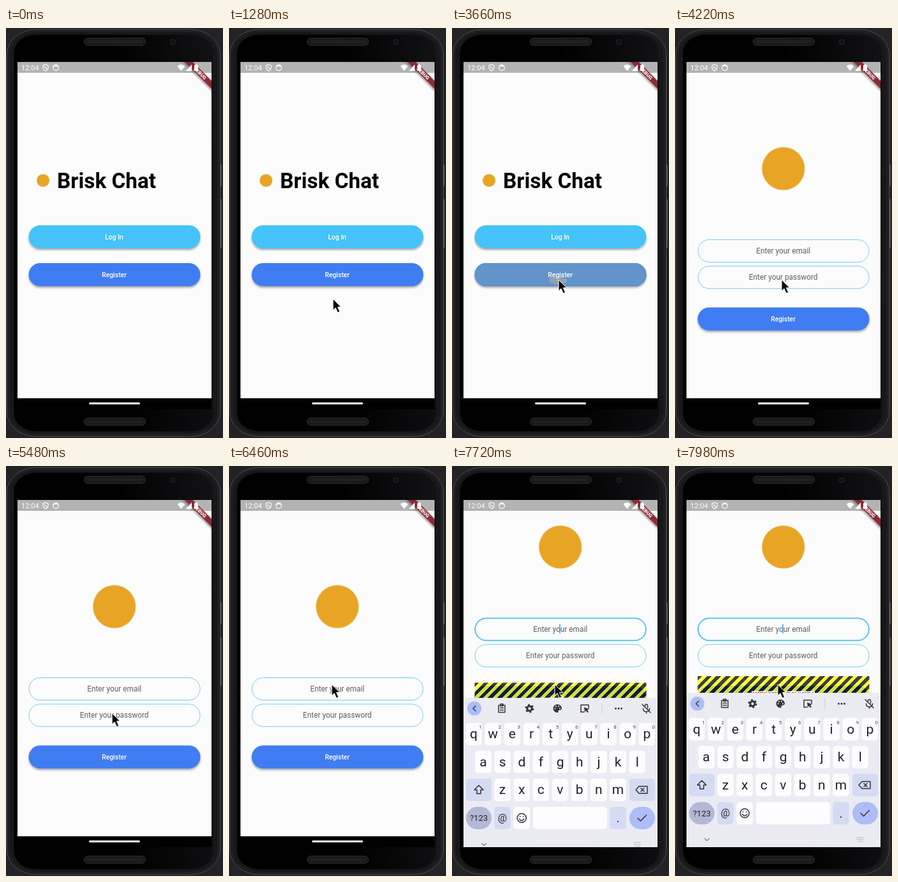
An HTML page for the animation above (8000 ms loop, 340 by 640 pixels).

```html
<!DOCTYPE html>
<html lang="en">
<head>
<meta charset="utf-8">
<title>Sign up on a phone</title>
<style>
  html, body { margin: 0; width: 100%; height: 100%; overflow: hidden; background: #232325; }
  svg { display: block; width: 340px; height: 640px; font-family: Roboto, sans-serif; }
  .mid { text-anchor: middle; }
  .label { font-size: 10.4px; font-weight: 500; fill: #fff; text-anchor: middle; }
  .hint { font-size: 11.85px; fill: #5e5e60; text-anchor: middle; }
  .line { fill: none; stroke: #333338; stroke-width: 1.5; stroke-linecap: round; stroke-linejoin: round; }
  .thin { stroke: #77777c; stroke-width: 1.1; }
</style>
</head>
<body>
<svg id="stage" viewBox="0 0 340 640"></svg>
<script>
const LOOP = 8000;
const PAPER = '#fcfcfc', BLUE = '#407df2', CYAN = '#44c3fa';
const TRAY = '#ebebf3', KEY = '#fdfdff', SOFT_KEY = '#d4dbf3', ACCENT = '#acbdf8';

const box = (x, y, w, h, r, fill, extra = '') =>
  `<rect x="${x}" y="${y}" width="${w}" height="${h}" rx="${r}" fill="${fill}" ${extra}/>`;
const text = (x, y, s, attrs) => `<text x="${x}" y="${y}" ${attrs}>${s}</text>`;
const line = (d, attrs = 'class="line"') => `<path d="${d}" ${attrs}/>`;
const button = (y, fill, label, overlay = '') =>
  box(35.5, y, 269, 36, 18, fill, 'filter="url(#shadow)"') + overlay +
  text(169.5, y + 21.5, label, 'class="label"');
const field = (y, hint) =>
  box(36, y, 268, 35, 17.5, 'none', 'stroke="#7cc6f8"') +
  text(169.7, y + 21.2, hint, 'class="hint"');

const defs = `<defs>
  <clipPath id="screen"><rect x="18" y="53" width="304" height="542"/></clipPath>
  <clipPath id="press"><rect x="35.5" y="367" width="269" height="36" rx="18"/></clipPath>
  <filter id="shadow" x="-5%" y="-20%" width="110%" height="160%">
    <feDropShadow dx="0" dy="2.4" stdDeviation="1.7" flood-color="#202028" flood-opacity=".4"/>
  </filter>
  <linearGradient id="face" x1="0" y1=".1" x2="1" y2="0">
    <stop offset=".5" stop-color="#000"/><stop offset="1" stop-color="#121215"/>
  </linearGradient>
  <linearGradient id="hazard" gradientUnits="userSpaceOnUse" x1="18" y1="53" x2="25.4" y2="60.4" spreadMethod="repeat">
    <stop offset=".25" stop-color="#000"/><stop offset=".25" stop-color="#ff0"/>
    <stop offset=".75" stop-color="#ff0"/><stop offset=".75" stop-color="#000"/>
  </linearGradient>
</defs>`;

const slot = y => box(122.5, y, 96, 11, 5.5, '#161618', 'stroke="#363638"') +
  box(126, y + 3, 89, 5, 2.5, '#202022');

const phone = box(334, 213, 4, 34, 1, '#505053') + box(334, 267, 4, 76, 1, '#505053') +
  box(1.5, 2.5, 334, 635, 46, '#18181a', 'ry="38" stroke="#525255"') +
  box(4.5, 5.5, 328, 629, 43, 'none', 'ry="35" stroke="#2c2c2f"') +
  box(12.5, 10.5, 312, 619, 34, 'url(#face)', 'ry="28"') + slot(16) + slot(609) +
  '<circle cx="261.5" cy="22" r="4" fill="#111114" stroke="#29292c"/>';

const welcome = box(18, 53, 304, 525, 0, PAPER) +
  text(80, 249.5, 'Brisk Chat', 'font-size="33.3" font-weight="700" fill="#050505"') +
  button(308, CYAN, 'Log In') +
  button(367, BLUE, 'Register', `<g clip-path="url(#press)">
    ${box(35.5, 367, 269, 36, 18, '#6294ca', `id="glow" stroke="${BLUE}"`)}
    <ellipse id="ripple" cx="166" cy="394" rx="14" ry="6.5" fill="#93a2b4"/></g>`);

const signup = `<g id="signup">${box(18, 53, 304, 525, 0, PAPER)}<g id="form">
  ${field(330.5, 'Enter your email')}
  <g id="focus">${box(36.2, 330.7, 267.6, 34.6, 17.3, 'none', 'stroke="#44c0f4" stroke-width="1.7"')}
    ${box(168.2, 340, 1.5, 14.5, 0, '#3f9fe8')}</g>
  ${field(371.7, 'Enter your password')}${button(436.2, BLUE, 'Register')}</g></g>`;

const hazard = `<g id="hazard-bar">${box(35.5, 328, 269, 30, 0, 'url(#hazard)', 'opacity=".75"')}
  ${box(120, 351.5, 99, 7, 0, '#fff')}
  ${text(169.5, 357, 'BOTTOM OVERFLOWED BY 41 PIXELS', 'class="mid" font-size="5.6" font-weight="800" fill="#a01818"')}</g>`;

const status = box(18, 53, 304, 17, 0, '#b3b3b4') +
  `<g transform="translate(304.2 70.8) rotate(45)">${box(-40, -4.5, 80, 9, 0, '#8b2c38', 'filter="url(#shadow)"')}
    ${text(0, 2.7, 'DEBUG', 'class="mid" font-size="7.5" font-weight="800" fill="#fff"')}</g>` +
  text(24, 66, '12:04', 'font-size="11" letter-spacing=".1" fill="#fff"') +
  `<g fill="none" stroke="#fff" stroke-width="1.2">
    <path d="M62 57l4 1.5v3q0 3.5-4 5.5q-4-2-4-5.5v-3zM60 60l4 4"/><circle cx="78" cy="62" r="4.3"/></g>
  <g fill="#fff"><path d="M74 61a4 4 0 0 1 8 0l-2-1h-4z"/>
    <path d="M268.5 59.5q6-5 12 0l-6 7.5z"/><path d="M282 67h9v-10z"/>
    <path d="M295 58h1.5v-1.5h3v1.5h1.5v9h-6z"/></g>`;

// Keyboard, drawn in its open position
const PITCH = 30.15;
const key = (x, y, w = 25.5, fill = KEY, r = 5) => box(x - w / 2, y - 17.5, w, 35, r, fill);
const letter = (x, y, c, size = 21) => text(x, y + 6.5, c, `class="mid" font-size="${size}" fill="#222226"`);
const row = (letters, x0, y, numbered) => [...letters].map((c, i) => {
  const x = x0 + i * PITCH;
  return key(x, y) + letter(x, y, c) +
    (numbered ? text(x + 10.5, y - 8.5, (i + 1) % 10, 'class="mid" font-size="8" fill="#444448"') : '');
}).join('');
const dot = (x, y, r, fill) => `<circle cx="${x}" cy="${y}" r="${r}" fill="${fill}"/>`;

const toolbar = dot(35, 371, 11, ACCENT) + line('M37 367l-4 4l4 4') +
  line('M73 366h10v11h-10zM76 364h4v3h-4zM75.5 370h5M75.5 373.5h5') +
  `<g fill="none" stroke="#333338"><circle cx="121.5" cy="371" r="3.7" stroke-width="3"/>
   <circle cx="121.5" cy="371" r="6" stroke-width="2" stroke-dasharray="2.9 3.38"/></g>
   <path d="M165 364.5a6.5 6.5 0 1 0 0 13q2 0 1.5-2.5q0-1.5 2-1.5q3.5 0 3.5-3q-1-6-7-6z" fill="#333338"/>` +
  [[161.5, 371], [163, 367.6], [167, 367.6], [169, 371]].map(([x, y]) => dot(x, y, 1.1, TRAY)).join('') +
  line('M207 376.5h-5v-11h12v5') +
  '<path d="M207 369l8 3l-3 1.5l2 3l-2 1l-2-3l-2 2z" fill="#333338"/>' +
  box(234.5, 363, 1, 16, 0, '#cccdd4') +
  [256.5, 261, 265.5].map(x => dot(x, 371, 1.5, '#333338')).join('') +
  line('M302.5 368v-1.5a2 2 0 0 1 4 0v4M299.5 371q0 5 5 5q5 0 5-5M304.5 376v2.5M298 364.5l13 13');

const keyboard = `<g id="keyboard">${box(18, 354, 304, 242, 0, TRAY)}${toolbar}
  ${row('qwertyuiop', 34, 411, true)}${row('asdfghjkl', 49, 454.5)}${row('zxcvbnm', 79, 498)}
  ${key(42, 498, 40, SOFT_KEY)}${key(298, 498, 40, SOFT_KEY)}
  ${line('M42 491l-7 7h4v6h6v-6h4z')}
  ${line('M293 492.5h13v11h-13l-5-5.5zM296 495.5l5 5M301 495.5l-5 5')}
  ${key(42, 542, 40, '#b3b9d4', 17.5)}${text(42, 546.5, '?123', 'class="mid" font-size="13" fill="#222226"')}
  ${key(79, 542, 25.5, SOFT_KEY)}${letter(79, 540.5, '@', 16)}${key(109.2, 542)}
  <g class="line"><circle cx="109.2" cy="542" r="7"/><path d="M105.5 543.5q3.7 5 7.4 0M106.7 539.5v.6M111.7 539.5v.6"/></g>
  ${key(185, 542, 116)}${key(260, 542, 25.5, SOFT_KEY)}${letter(260, 542, '.', 19)}
  ${key(298, 542, 40, ACCENT, 17.5)}${line('M291 542l4.5 4.5l9-9')}
  ${line('M46.5 581.5l3.5 3.5l3.5-3.5', 'class="line thin"')}
  ${line('M285 580h11M285 583h11M287 586h7', 'class="line thin" stroke-dasharray="1.2 1.7" style="stroke-linecap:butt"')}</g>`;

document.getElementById('stage').innerHTML = defs + phone +
  `<g clip-path="url(#screen)">${welcome}${signup}
    <g id="lift"><circle id="badge" r="33.5" fill="#e8a424"/></g>${hazard}${status}
    ${box(18, 578, 304, 17, 0, '#000')}${keyboard}</g>` +
  box(130, 584.5, 80, 3, 1.5, '#f7f7f2', 'id="home"') +
  `<path id="pointer" d="M0 0v17.5l4-3.700l3.200 7.400l3.400-1.500l-3.200-7.200h5.300z" fill="#080808" stroke="#fff" stroke-width="1"/>`;

// Each step: [time, value, easing to the next step]
function play(id, prop, steps) {
  const all = [[0, steps[0][1]], ...steps, [LOOP, steps.at(-1)[1]]];
  const frames = all.map(([t, value, easing = 'linear']) => ({ offset: t / LOOP, [prop]: value, easing }));
  document.getElementById(id).animate(frames, { duration: LOOP, iterations: Infinity }).startTime = 0;
}
const at = (x, y, s = 1) => `translate(${x}px, ${y}px) scale(${s})`;
const slide = steps => steps.map(([t, y, easing]) => [t, `translate(0px, ${y}px)`, easing]);
const HOLD = 'steps(1, end)';
const SOFT = 'cubic-bezier(.4, 0, .2, 1)';

play('pointer', 'transform', [
  [960, at(176, 560), 'ease-out'], [1260, at(163, 423)], [1700, at(163, 423), 'ease-in-out'],
  [2500, at(167, 393)], [5300, at(167, 393), 'ease-in-out'], [6000, at(161, 341)]]);
play('pointer', 'opacity', [[959, 0, HOLD], [960, 1]]);

play('glow', 'opacity', [[3560, 0], [3650, 1], [3780, 1], [4000, 0]]);
play('ripple', 'opacity', [[3600, 0], [3650, 1], [3760, .8], [3960, 0]]);
play('ripple', 'rx', [[3600, '4px'], [3660, '14px'], [3760, '14px', 'ease-out'], [3960, '150px']]);
play('ripple', 'ry', [[3600, '2px'], [3660, '6.5px'], [3760, '6.5px', 'ease-out'], [3960, '60px']]);

play('signup', 'opacity', [[3760, 0, 'ease-in'], [4060, 1]]);
play('signup', 'transform', slide([[3760, 131, SOFT], [4060, 0]]));
play('badge', 'transform', [[3760, at(58, 238, .3), SOFT], [4060, at(169.7, 219.5)]]);

const lift = slide([[7470, 0], [7540, -18], [7585, -55], [7640, -93]]);
play('form', 'transform', lift);
play('lift', 'transform', lift);
play('focus', 'opacity', [[7400, 0], [7500, 1]]);
play('keyboard', 'transform', slide([[7440, 243], [7540, 135], [7600, 62], [7680, 18, 'ease-out'], [7780, 0]]));
play('hazard-bar', 'opacity', [[7639, 0, HOLD], [7640, 1]]);
play('hazard-bar', 'transform', slide([[7640, 37], [7700, 14, 'ease-out'], [7820, 0]]));
play('home', 'opacity', [[7540, 1], [7640, .45]]);
</script>
</body>
</html>
```
